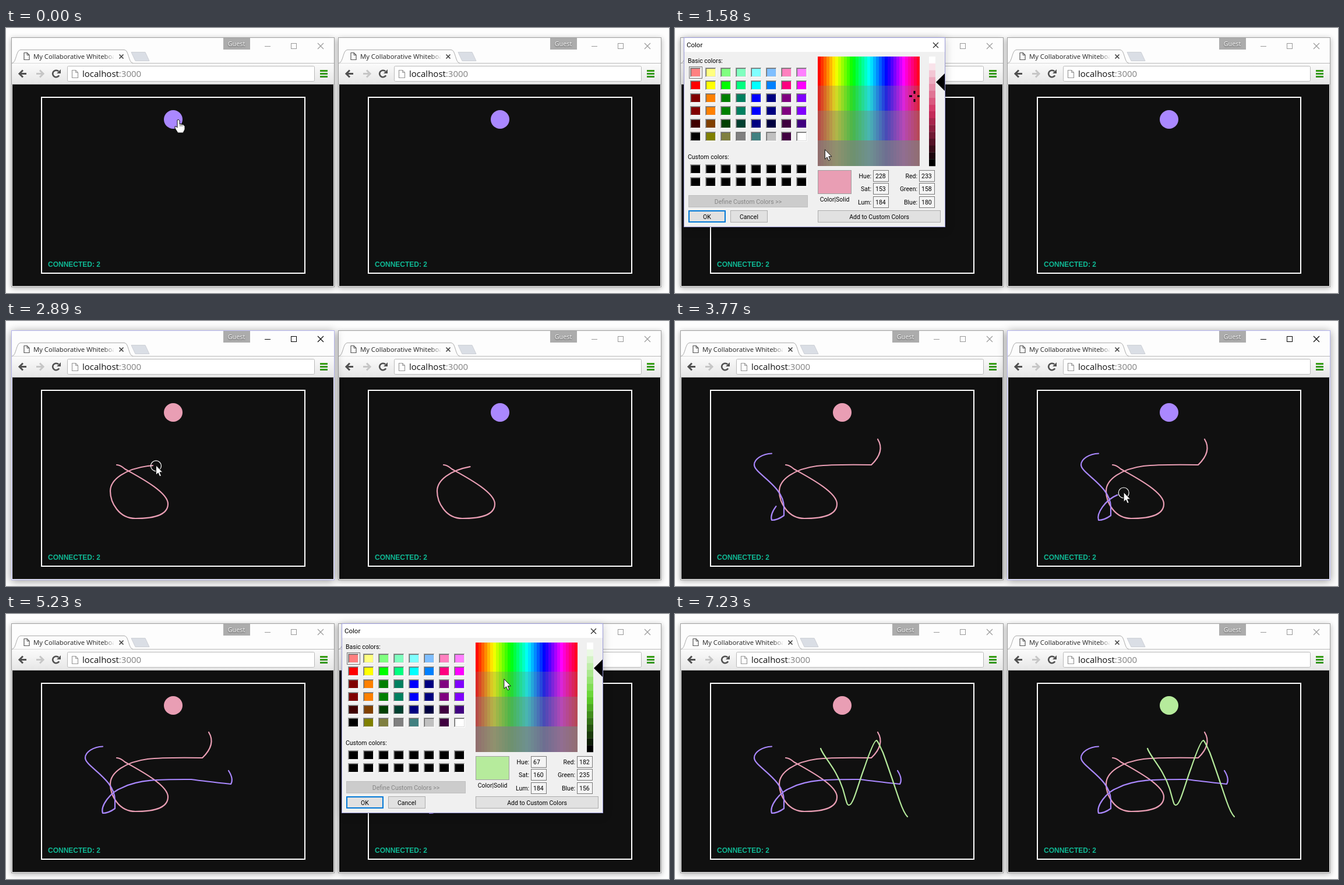
An HTML page with a canvas that plays this animation: 1138 by 455 pixels, repeating every 7330 ms.

```html
<!DOCTYPE html>
<html lang="en">
<head>
<meta charset="utf-8">
<title>Shared whiteboard</title>
<style>
html, body { margin: 0; width: 100%; height: 100%; overflow: hidden; background: #fdfdfd; }
canvas { display: block; }
</style>
</head>
<body>
<canvas id="stage" width="1138" height="455"></canvas>
<script>
const LOOP = 7330, GAP = 561;
const stage = document.getElementById('stage').getContext('2d');
const panel = document.createElement('canvas');
panel.width = 470;
panel.height = 350;
const panelCtx = panel.getContext('2d');
let g = stage;

const clamp = v => Math.min(1, Math.max(0, v));
const ease = u => u * u * (3 - 2 * u);
const mix = (a, b, u) => a + (b - a) * u;
const within = (t, a, b) => t >= a && t < b;

// ---------- drawing helpers ----------
function box(x, y, w, h, fill, line, width = 1) {
  if (fill) { g.fillStyle = fill; g.fillRect(x, y, w, h); }
  if (line) {
    g.strokeStyle = line;
    g.lineWidth = width;
    g.strokeRect(x + width / 2, y + width / 2, w - width, h - width);
  }
}
function shape(d, fill, line, width = 1) {
  const p = new Path2D(d);
  if (fill) { g.fillStyle = fill; g.fill(p); }
  if (line) { g.strokeStyle = line; g.lineWidth = width; g.stroke(p); }
}
function ring(x, y, r, line, width, from = 0, to = 7) {
  g.beginPath();
  g.arc(x, y, r, from, to);
  g.strokeStyle = line;
  g.lineWidth = width;
  g.stroke();
}
function text(s, x, y, font, fill, align = 'left') {
  g.font = font;
  g.fillStyle = fill;
  g.textAlign = align;
  g.fillText(s, x, y);
}
function cross(x, y, r, color, width) {
  shape(`M${x - r} ${y - r}l${2 * r} ${2 * r}m0 ${-2 * r}l${-2 * r} ${2 * r}`, null, color, width);
}

// ---------- colour: hue, saturation and luminance run 0..240 ----------
function toRgb(h, s, l) {
  const L = l / 240, a = s / 240 * Math.min(L, 1 - L);
  return [0, 8, 4].map(n => {
    const k = (n + h / 20) % 12;
    return Math.round(255 * (L - a * Math.max(-1, Math.min(k - 3, 9 - k, 1))));
  });
}
const css = (h, s, l) => `rgb(${toRgb(h, s, l)})`;
const LUM = 184, FIRST = [171.43, 240];
const field = { x: 245, y: 49, w: 175, h: 188 };
const spot = (h, s) => [field.x + h / 240 * field.w, field.y + (1 - s / 240) * field.h];

// ---------- timeline ----------
const dialogs = [
  { side: 0, open: 300, drag: 950, drop: 1420, set: 1890, pick: [228, 153] },
  { side: 1, open: 4380, drag: 4700, drop: 5240, set: 5890, pick: [67, 160] }
];
const START = css(...FIRST, LUM);
const chosen = dialogs.map(d => css(...d.pick, LUM));

function pen(side, from, to, bend, ink, d) {
  const path = document.createElementNS('http://www.w3.org/2000/svg', 'path');
  path.setAttribute('d', d);
  const len = path.getTotalLength();
  const reach = t => len * clamp((t - from) / (to - from)) ** bend;
  const at = t => {
    const p = path.getPointAtLength(reach(t));
    return [p.x + side * GAP, p.y];
  };
  return { side, from, to, ink, reach, at, line: new Path2D(d) };
}
const pens = [
  pen(0, 2190, 3150, 1, chosen[0],
    'M190 247q6 0 14 7C225 266 278 293 278 314S250 339 222 339 179 312 179 292 205 254 243 249Q270 246 337 247 361 224 348 203'),
  pen(1, 3420, 3950, 1.5, START,
    'M166 227.500C150 228 136 237 136 247 136 262 187 283 187 320V334Q176 342 166 342C162 330 178 306 200 298 230 283 270 284 318 284Q340 287 386 292 391 283 382 269'),
  pen(1, 6180, 6640, 1, chosen[1],
    'M250 231C256 247 277 266 288 300 295 324 295 329 299 328 306 328 315 290 325 264Q341 217 346 217C349 219 353 230 357 238 368 268 380 305 386 322Q393 342 399 348')
];
const onRight = ([x, y]) => [x + GAP, y];
const BALL = [295, 157];

// Each hop: start, end, place reached
const hops = [
  [240, 520, [550, 138]],
  [600, 840, [425, 85]],
  [950, 1250, spot(...dialogs[0].pick)],
  [1420, 1760, [77, 316]],
  [2060, 2190, pens[0].at(0)],
  [3190, 3400, pens[1].at(0)],
  [3950, 4250, onRight(BALL)],
  [4360, 4670, onRight([364, 75])],
  [4700, 5000, onRight(spot(...dialogs[1].pick))],
  [5240, 5560, onRight([55, 318])],
  [5865, 6090, pens[2].at(0)],
  [6640, 6830, [1063, 460]]
];
const drawing = t => pens.find(p => within(t, p.from, p.to));
function pointer(t) {
  let place = BALL;
  for (const [a, b, to] of hops) {
    if (t < a) break;
    const done = pens.filter(p => p.to <= a).pop();
    const from = done && place === done.at0 ? done.at(LOOP) : place;
    if (t < b) {
      const u = ease((t - a) / (b - a));
      return [mix(from[0], to[0], u), mix(from[1], to[1], u)];
    }
    place = to;
    const next = pens.find(p => p.from >= b - 1 && p.from - b < 100);
    if (next && t >= next.from) {
      next.at0 = place;
      if (t < next.to + 40) return next.at(t);
    }
  }
  return place;
}
function drawPointer(t) {
  if (t >= 6830) return;
  const [x, y] = pointer(t);
  g.save();
  g.translate(x, y);
  if (drawing(t)) ring(0, 1, 9, '#fff', 1.2);
  g.lineJoin = 'round';
  if (t < 290 || within(t, 4210, 4380)) {
    shape('M-1 1Q1-1 3 2V8Q5 6 7 9 9 7 10 10L12 11V17L9 23H0L-5 15V12H-3L-1 14Z', '#fff', '#111');
    shape('M4 8v4M7 9v3', null, '#333');
  } else {
    shape('M0 0V16.500L3.700 13 6.300 19 9 18 6.500 12H11.500Z', '#fff', '#111');
  }
  g.restore();
}

// ---------- colour dialogs ----------
const UI = '10.5px Roboto, "Liberation Sans", sans-serif';
const topHues = [0, 40, 80, 100, 120, 140, 220, 200];
const lowHues = [0, 20, 80, 110, 160, 160, 200, 180];
const rowLum = [180, 120, 60, 60, 30];
const lastRow = ['#000', '#808000', '#808040', '#808080', '#408080', '#c0c0c0', '#400040', '#fff'];
function swatch(col, row) {
  if (row === 5) return lastRow[col];
  const hues = row < 2 ? topHues : lowHues;
  const boost = row > 1 && col % 3 === 1 ? 2 : 1;
  return css(hues[col], 240, rowLum[row] * boost);
}
function picked(d, t) {
  if (t < d.drag) return FIRST;
  if (t >= d.drop) return d.pick;
  const [x, y] = pointer(t);
  return [(x - d.side * GAP - field.x) / field.w * 240, (1 - (y - field.y) / field.h) * 240];
}
function well(cx, cy, color) {
  box(cx - 9, cy - 8, 19, 17, '#fff');
  box(cx - 9, cy - 8, 18, 16, '#a0a0a0');
  box(cx - 8, cy - 7, 17, 15, '#dcdcdc');
  box(cx - 8, cy - 7, 16, 14, '#696969');
  box(cx - 7, cy - 6, 15, 13, color);
}
function button(x, y, w, label, kind) {
  const off = kind === 'off', main = kind === 'main';
  box(x, y, w, 21, off ? '#cccccc' : '#e1e1e1', main ? '#0078d7' : off ? '#bfbfbf' : '#adadad', main ? 2 : 1);
  text(label, x + w / 2, y + 14.5, UI, off ? '#858585' : '#000', 'center');
}
function paintSpectrum(h, s, marked) {
  const bands = [0, 50, 93, 144, field.h];
  for (let j = 0; j < 4; j++) {
    for (let x = 0; x < field.w; x += 5)
      box(field.x + x, field.y + bands[j], 5, bands[j + 1] - bands[j],
        css((x + 1) / field.w * 240, 240 - 69 * j, 120));
  }
  if (marked) {
    const [cx, cy] = spot(h, s).map(Math.round);
    g.save();
    g.beginPath();
    g.rect(field.x, field.y, field.w, field.h);
    g.clip();
    shape(`M${cx - 9} ${cy}h5m9 0h5M${cx} ${cy - 9}v5m0 9v5`, null, '#000', 3);
    g.restore();
  }
  for (let i = 0; i < 16; i++)
    box(436, field.y + i * 11.75, 11, 12, css(h, s, 240 - i * 16));
  shape('M448 93l15-15v30z', '#000');
}
function paintDialog(d, t) {
  const [h, s] = picked(d, t);
  box(15, 16, 449, 326, '#f0f0f0');
  box(16, 17, 447, 24, '#fff');
  box(15, 16, 449, 326, null, '#9a9ad8');
  text('Color', 20, 33, '11.5px Roboto, "Liberation Sans", sans-serif', '#000');
  cross(447.5, 29.5, 4.5, '#222', 1.1);
  text('Basic colors:', 22, 60, UI, '#000');
  text('Custom colors:', 22, 225, UI, '#000');
  for (let col = 0; col < 8; col++) {
    for (let row = 0; row < 6; row++) well(35 + 26 * col, 76 + 22 * row, swatch(col, row));
    for (let row = 0; row < 2; row++) well(35 + 26 * col, 242 + 22 * row, '#000');
  }
  g.setLineDash([1, 1]);
  box(24, 66, 23, 21, null, '#000');
  g.setLineDash([]);
  button(23, 287, 205, 'Define Custom Colors >>', 'off');
  button(23, 313, 64, 'OK', 'main');
  button(95, 313, 64, 'Cancel');
  button(245, 313, 211, 'Add to Custom Colors');
  paintSpectrum(h, s, !within(t, d.drag, d.drop));

  box(245, 244, 58, 41, css(h, s, LUM), '#a0a0a0');
  text('Color|Solid', 274, 298, UI, '#000', 'center');
  const rgb = toRgb(h, s, LUM);
  const entry = (label, value, x, row) => {
    const y = 244 + Math.floor(row * 22.5);
    text(label, x - 3, y + 14, UI, '#000', 'right');
    box(x, y, 27, 20, '#f4f4f4', '#7a7a7a');
    text(Math.round(value), x + 4, y + 14, UI, '#000');
  };
  ['Hue:', 'Sat:', 'Lum:'].forEach((s0, i) => entry(s0, [h, s, LUM][i], 340, i));
  ['Red:', 'Green:', 'Blue:'].forEach((s0, i) => entry(s0, rgb[i], 419, i));
}
function drawDialog(d, t) {
  const fade = 155;
  if (!within(t, d.open, d.set + fade)) return;
  const rise = ease(clamp((t - d.open) / 170)), sink = clamp((t - d.set) / fade);
  const scale = sink ? 1 - 0.045 * sink : 0.9 + 0.1 * rise;
  g = panelCtx;
  g.clearRect(0, 0, 470, 350);
  paintDialog(d, t);
  g = stage;
  g.save();
  g.globalAlpha = rise * (1 - sink);
  g.translate(239 + d.side * GAP, 178);
  g.scale(scale, scale);
  g.shadowColor = 'rgba(0,0,0,.2)';
  g.shadowBlur = 16;
  g.shadowOffsetY = 2;
  g.drawImage(panel, -239, -178);
  g.restore();
}

// ---------- browser windows ----------
const SANS = 'px "Open Sans", "Noto Sans", sans-serif';
function pageIcon(x, y, w, h, color) {
  shape(`M${x} ${y}h${w - 4}l4 4v${h - 4}h${-w}z`, '#fff', color, 1.2);
  shape(`M${x + w - 4} ${y}v4h4`, null, color);
}
function arrow(x, dir, color) {
  shape(`M${x} 78.500h${13 * dir}M${x + 7 * dir} 72.500l${-6 * dir} 6 ${6 * dir} 6`, null, color, 3);
}
function gradient(x0, y0, x1, y1, a, b) {
  const fill = g.createLinearGradient(x0, y0, x1, y1);
  fill.addColorStop(0, a);
  fill.addColorStop(1, b);
  return fill;
}
function drawFrame(active) {
  g.save();
  g.shadowColor = active ? 'rgba(0,0,0,.4)' : 'rgba(0,0,0,.3)';
  g.shadowBlur = active ? 14 : 9;
  g.shadowOffsetY = 2;
  box(9, 16, 555, 429, '#fff');
  g.restore();
  box(9, 16, 555, 429, '#fdfdfd', active ? '#b4b4ee' : '#a0a0a0');
  box(373, 17, 46, 20, '#acacac');
  g.save();
  g.shadowColor = '#444';
  g.shadowBlur = 2;
  g.shadowOffsetY = 1;
  text('Guest', 395.5, 31, 10.8 + SANS, '#fff', 'center');
  g.restore();
  const ink = active ? '#000' : '#999';
  box(444, 31, 10, 1, ink);
  box(489, 26, 10, 10, null, ink);
  cross(540, 31, 5, ink, 1.1);
}
function drawToolbar() {
  box(10, 60, 553, 37, gradient(0, 61, 0, 97, '#fbfbfb', '#e6e6e6'));
  box(10, 60, 553, 1, '#b8b8b8');
  box(10, 96, 553, 1, '#c4c4c4');
  shape('M10 60.500C18 60 17 37.500 25 37.500H203C211 37.500 210 60 218 60.500', '#fcfcfc', '#ababab');
  g.lineJoin = 'round';
  shape('M215 41.500h24l7 15h-24z', '#dadee5', '#cdd0d6');
  pageIcon(31, 42.5, 9, 12, '#555');
  g.save();
  g.beginPath();
  g.rect(44, 38, 141, 20);
  g.clip();
  text('My Collaborative Whiteboard', 47, 53, 11.3 + SANS, gradient(168, 0, 187, 0, '#222', 'rgba(34,34,34,0)'));
  g.restore();
  cross(198, 49, 3.5, '#444', 1.7);

  g.lineJoin = 'miter';
  arrow(22, 1, '#505050');
  arrow(65, -1, '#c6c6c6');
  ring(86, 78.5, 5.8, '#505050', 2.6, 0.5, 5.5);
  shape('M94 71v7h-7z', '#505050');
  g.beginPath();
  g.roundRect(105.5, 65.5, 424, 26, 2);
  g.fillStyle = '#fff';
  g.fill();
  g.strokeStyle = '#b9b9b9';
  g.lineWidth = 1;
  g.stroke();
  pageIcon(113.5, 72.5, 10, 13, '#999');
  text('localhost', 131, 84, 15 + SANS, '#111');
  text(':3000', 131 + g.measureText('localhost').width, 84, 15 + SANS, '#808080');
  for (let y = 72; y < 85; y += 5) {
    box(539, y, 13, 3, '#36a310');
    box(539, y + 2, 13, 1, '#2a7d0d');
  }
}
function drawBoard(side, t) {
  box(11, 97, 551, 346, '#101010');
  box(60, 118, 454, 304, null, '#fff', 2);
  g.beginPath();
  g.arc(287, 157, 16, 0, 7);
  g.fillStyle = t >= dialogs[side].set ? chosen[side] : START;
  g.fill();
  text('CONNECTED: 2', 72, 410, 'bold 12px "Liberation Sans", Arial, sans-serif', '#0fb894');
  g.lineCap = g.lineJoin = 'round';
  g.lineWidth = 2.2;
  for (const p of pens) {
    // The other window receives the line a little later
    const reach = p.reach(t - (p.side === side ? 12 : 45));
    if (!reach) continue;
    g.strokeStyle = p.ink;
    g.setLineDash([reach, 2000]);
    g.stroke(p.line);
  }
}
function drawWindow(side, t, active) {
  g.save();
  g.translate(side * GAP, 0);
  drawFrame(active);
  drawToolbar();
  drawBoard(side, t);
  g.restore();
}

function render(t) {
  box(0, 0, 1138, 455, '#fdfdfd');
  const left = within(t, 225, 320) || within(t, 1890, 3400);
  const right = within(t, 3400, 4380) || within(t, 5890, 7230);
  const order = left ? [1, 0] : [0, 1];
  order.forEach(side => drawWindow(side, t, side ? right : left));
  dialogs.forEach(d => drawDialog(d, t));
  drawPointer(t);
}
const began = performance.now();
function tick() {
  render((performance.now() - began) % LOOP);
  requestAnimationFrame(tick);
}
tick();
</script>
</body>
</html>
```
